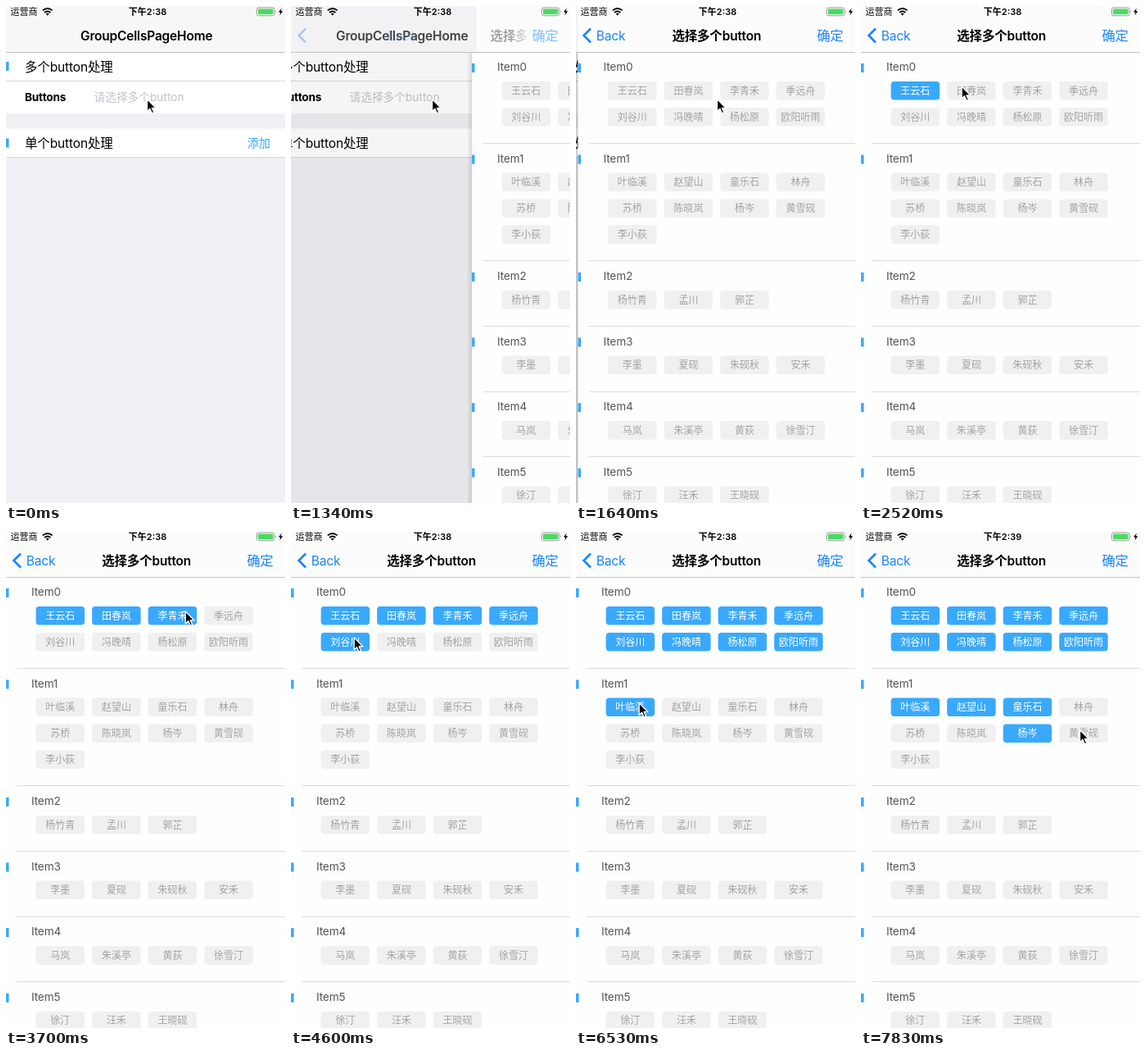
Recreate the animation shown at these times as an HTML page. Size 341x606 px, loop 8 s.

```html
<!DOCTYPE html>
<html lang="zh-CN">
<head>
<meta charset="utf-8">
<title>Button list</title>
<style>
  html, body { margin: 0; width: 100%; height: 100%; overflow: hidden; background: #efeff4; }
  svg { display: block; width: 100vw; height: 100vh; }
  text { font-family: Inter, "Noto Sans CJK SC", "Noto Sans CJK", sans-serif; white-space: pre; }
  .head { font-size: 15.5px; letter-spacing: -.15px; }
  .title { font-size: 15.5px; font-weight: 600; letter-spacing: -.2px; text-anchor: middle; }
  .item { font-size: 13.6px; fill: #555; letter-spacing: -.15px; }
  .nav { font-size: 15.6px; fill: #1b84fb; letter-spacing: -.2px; }
  .chip rect { fill: #f0f0f0; }
  .chip text { font-size: 12px; fill: #a2a2a2; text-anchor: middle; }
  .chip.on rect { fill: #39a9fd; }
  .chip.on text { fill: #fff; }
</style>
</head>
<body>
<svg viewBox="0 0 341 606" preserveAspectRatio="none">
  <defs>
    <linearGradient id="shade">
      <stop offset="0" stop-opacity="0"/>
      <stop offset="1" stop-opacity=".12"/>
    </linearGradient>
    <linearGradient id="fade" gradientUnits="userSpaceOnUse" x1="268" y1="0" x2="294" y2="0">
      <stop offset="0"/>
      <stop offset="1" stop-opacity="0"/>
    </linearGradient>
  </defs>

  <g id="home">
    <rect width="341" height="606" fill="#efeff4"/>
    <path fill="#fff" d="M0 56h341v75H0zM0 149.5h341v35H0z"/>
    <path fill="none" stroke="#d6d6da" d="M0 91.5h341M0 184.5h341"/>
    <path fill="#39a9fd" d="M0 68h3.5v11H0zM0 161.5h3.5v11H0z"/>
    <text class="head" x="23" y="80">多个button处理</text>
    <text class="head" x="23" y="173">单个button处理</text>
    <text x="23" y="116" font-size="13.6" font-weight="700" letter-spacing="-.2">Buttons</text>
    <text x="107.5" y="116" font-size="13.7" fill="#c4c4c9">请选择多个button</text>
    <text x="295" y="172" font-size="14" fill="#2fa5fd">添加</text>
  </g>
  <rect id="dim" width="341" height="606"/>

  <g id="list">
    <rect x="-6" width="6" height="606" fill="url(#shade)"/>
    <rect width="341" height="606" fill="#fefefe"/>
  </g>

  <rect id="bar" width="341" height="56"/>
  <rect id="barList" width="341" height="56" fill="#fcfcfc"/>
  <path d="M0 56.5h341" stroke="#c3c3c6"/>
  <text id="homeTitle" class="title" y="41.5">GroupCellsPageHome</text>
  <g id="navList">
    <path id="chevron" d="M18 27.5L9.5 36l8.5 8.5" fill="none" stroke="#1b84fb" stroke-width="2.6"/>
    <text id="back" class="nav" y="41.5">Back</text>
    <text id="listTitle" class="title" y="41.5" fill="url(#fade)">选择多个button</text>
    <text id="done" class="nav" x="294.5" y="42" style="font-size:16.3px">确定</text>
  </g>

  <text x="5.5" y="11" font-size="11">运营商</text>
  <path d="M44.8 5.4q5.9-4.8 11.800 0M47 8q3.700-2.900 7.400 0" fill="none" stroke="#000" stroke-width="1.800"/>
  <path d="M48.600 9.300q2.100-1.300 4.200 0l-2.100 2.400z"/>
  <text id="clock" x="173" y="11" font-size="11" font-weight="600" text-anchor="middle"></text>
  <rect x="306.500" y="2" width="21.500" height="9.800" rx="2.300" fill="#fff" stroke="#999"/>
  <rect x="308" y="3.500" width="18.500" height="6.800" rx="1" fill="#4cd964"/>
  <path d="M329 5.200q1.600 1.700 0 3.400z" fill="#888"/>
  <path d="M337 2.500l-4 5h2.400l-1 4 4-5.200h-2.500z"/>

  <path id="arrow" d="M.5-.5v14.200l3.200-3 2.300 5.200 2.400-1-2.300-5.100h4.400z" stroke="#fff" stroke-width="1.300" stroke-linejoin="round"/>
</svg>

<script>
const LOOP = 8000, WIDTH = 341;
const PUSH_AT = 1340, STEP = 147.5; // the picture advances in even steps
const $ = id => document.getElementById(id);

const sections = [
  "王云石 田春岚 李青禾 季远舟 刘谷川 冯晚晴 杨松原 欧阳听雨",
  "叶临溪 赵望山 童乐石 林舟 苏桥 陈晓岚 杨岑 黄雪砚 李小荻",
  "杨竹青 孟川 郭芷",
  "李墨 夏砚 朱砚秋 安禾",
  "马岚 朱溪亭 黄荻 徐雪汀",
  "徐汀 汪禾 王晓砚"
].map(s => s.split(" "));
const spots = []; // top left corner of every chip

function buildList() {
  let top = 56, out = "";
  sections.forEach((names, n) => {
    if (n) out += `<path d="M13 ${Math.floor(top) + .5}H341" stroke="#dcdcde"/>`;
    out += `<rect y="${top + 14}" width="3.5" height="11" fill="#39a9fd"/>
      <text class="item" x="31" y="${top + 23}">Item${n}</text>`;
    names.forEach((name, i) => {
      const x = 36.6 + i % 4 * 68.55, y = top + 36 + Math.floor(i / 4) * 31.9;
      spots.push([x, y]);
      out += `<g class="chip"><rect x="${x}" y="${y}" width="59.5" height="22.6" rx="4"/>
        <text x="${x + 29.75}" y="${y + 15.7}">${name}</text></g>`;
    });
    top += 47.7 + Math.ceil(names.length / 4) * 31.9;
  });
  $("list").insertAdjacentHTML("beforeend", out);
}
buildList();
const chips = [...document.querySelectorAll(".chip")];

// Pointer stops: a chip to press, or a point to pass
const press = (step, chip) => ({ step, chip, at: [spots[chip][0] + 40, spots[chip][1] + 6.5] });
const pass = (step, x, y) => ({ step, at: [x, y] });
const stops = [
  pass(0, 172, 114),
  press(7, 0), press(9, 1), press(12, 2), press(18, 3), pass(19, 189, 104),
  press(22, 4), press(26, 5), press(28, 6), press(30, 7), pass(32, 226, 230),
  press(35, 8), press(37, 9), press(40, 10), press(42, 14), pass(44, 267, 243)
];

// The pointer rests, then eases out into the next stop
function pointer(step) {
  const i = stops.findIndex(s => s.step > step);
  if (i < 0) return stops[stops.length - 1].at;
  if (i === 0) return stops[0].at;
  const from = stops[i - 1], to = stops[i];
  const span = Math.min(2.1, to.step - from.step);
  const p = Math.max(0, 1 - (to.step - step) / span);
  const e = 1 - (1 - p) ** 1.6;
  return from.at.map((v, k) => v + (to.at[k] - v) * e);
}

// Critically damped spring: 1 before the push, 0 at rest
function spring(step) {
  if (step < 0) return 1;
  const a = 1.24 + step * 2.88;
  return (1 + a) * Math.exp(-a);
}

const move = (id, dx) => $(id).setAttribute("transform", `translate(${dx})`);
const alpha = (id, v) => $(id).setAttribute("opacity", Math.min(1, Math.max(0, v)));

function render(t) {
  const step = Math.floor((t - PUSH_AT) / STEP + .01);
  const u = spring(step), x = u * WIDTH, shift = (x - WIDTH) * .3;
  const q = u ** 1.5; // bar items settle sooner than the page
  const pushed = step >= 0;

  for (const id of ["list", "barList", "navList"]) $(id).style.display = pushed ? "" : "none";
  move("home", shift);
  move("list", x);
  move("barList", x * 1.025);
  alpha("dim", (1 - u) * .11);
  $("bar").setAttribute("fill", pushed ? "#f2f2f4" : "#f7f7f7");

  $("homeTitle").setAttribute("x", 171.7 + shift);
  $("listTitle").setAttribute("x", 171.7 + q * 242);
  $("back").setAttribute("x", 24.7 + q * 178);
  alpha("homeTitle", q * 1.4);
  alpha("listTitle", 1 - q * 1.25);
  alpha("back", 1 - q * 1.5);
  alpha("chevron", 1 - q * 1.25);
  alpha("done", 1 - q * .9);

  const [px, py] = pointer(step);
  $("arrow").setAttribute("transform", `translate(${px} ${py}) scale(1.06)`);
  const on = new Set(stops.filter(s => s.step <= step).map(s => s.chip));
  chips.forEach((c, i) => c.classList.toggle("on", on.has(i)));
  $("clock").textContent = step < 42 ? "下午2:38" : "下午2:39";
}

const start = performance.now();
function tick() {
  render((performance.now() - start) % LOOP);
  requestAnimationFrame(tick);
}
tick();
</script>
</body>
</html>
```
